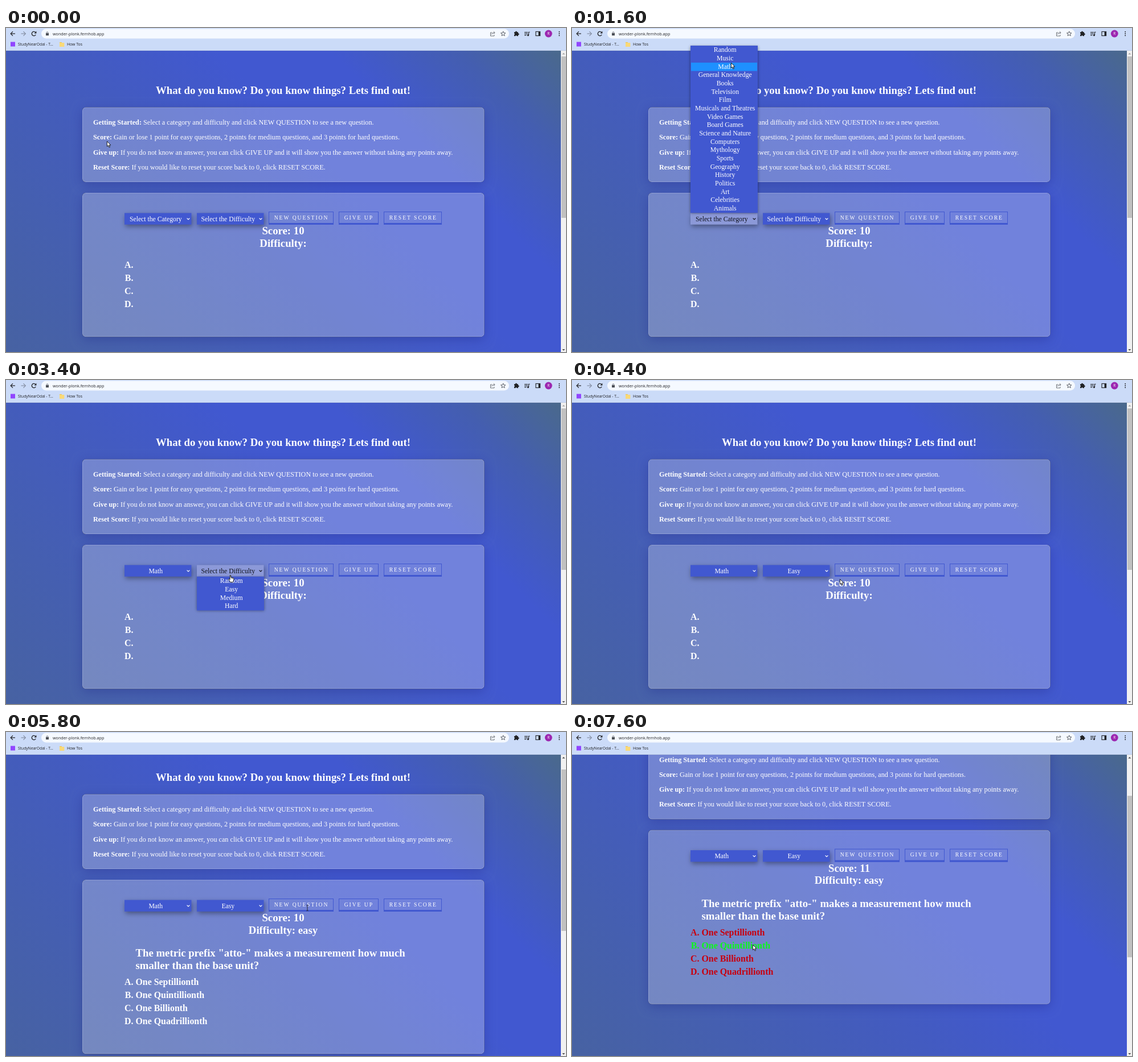
An HTML page with a canvas for the animation above (8 s loop, 983 by 570 pixels).

```html
<!DOCTYPE html>
<html lang="en">
<head>
<meta charset="utf-8">
<title>Quiz page</title>
<style>
  html, body { margin: 0; width: 100%; height: 100%; overflow: hidden; background: #4158d0; }
  canvas { display: block; }
</style>
</head>
<body>
<canvas id="stage" width="983" height="570"></canvas>
<script>
const ctx = document.getElementById('stage').getContext('2d');
const LOOP = 8000, TOP = 40, VIEW_W = 974;
const SERIF = '"Liberation Serif", "Times New Roman", serif';
const SANS = '"Open Sans", "Noto Sans", sans-serif';
const BLUE = '#4158d0', INK = '#202124';
const ROW = 14.66;

const CATEGORIES = ['Random', 'Music', 'Math', 'General Knowledge', 'Books', 'Television', 'Film',
  'Musicals and Theatres', 'Video Games', 'Board Games', 'Science and Nature', 'Computers', 'Mythology',
  'Sports', 'Geography', 'History', 'Politics', 'Art', 'Celebrities', 'Animals'];
const LEVELS = ['Random', 'Easy', 'Medium', 'Hard'];
const ANSWERS = ['One Septillionth', 'One Quintillionth', 'One Billionth', 'One Quadrillionth'];
const HELP = [
  ['Getting Started:', ' Select a category and difficulty and click NEW QUESTION to see a new question.'],
  ['Score:', ' Gain or lose 1 point for easy questions, 2 points for medium questions, and 3 points for hard questions.'],
  ['Give up:', ' If you do not know an answer, you can click GIVE UP and it will show you the answer without taking any points away.'],
  ['Reset Score:', ' If you would like to reset your score back to 0, click RESET SCORE.']
];

// Pointer path: time, x, y
const PATH = [
  [0, 177, 199], [700, 317, 335], [1200, 317, 335], [1600, 279, 61], [1700, 279, 61], [1800, 281, 70],
  [2000, 281, 70], [2200, 283, 82], [2300, 312, 316], [2400, 312, 316], [2600, 395, 355], [2700, 395, 355],
  [2800, 395, 359], [2900, 395, 359], [3100, 396, 338], [3300, 396, 338], [3400, 394, 343], [3500, 394, 343],
  [3800, 393, 364], [4000, 393, 364], [4400, 470, 350], [4600, 470, 350], [4800, 537, 323], [4900, 537, 323],
  [5100, 535, 321], [5200, 535, 321], [5500, 529, 309], [6200, 529, 309], [6500, 337, 336], [6800, 337, 336],
  [7000, 328, 361], [7100, 328, 361], [7300, 317, 375], [7500, 317, 375], [7600, 317, 374], [8000, 317, 374]
];

function pointerAt(t) {
  const i = PATH.findIndex(p => p[0] > t);
  const [t0, x0, y0] = PATH[i - 1], [t1, x1, y1] = PATH[i];
  const k = (t - t0) / (t1 - t0);
  return { x: x0 + (x1 - x0) * k, y: y0 + (y1 - y0) * k };
}

const between = (t, a, b) => t >= a && t < b;

function text(str, x, y, size, opt = {}) {
  ctx.font = `${opt.bold ? 'bold ' : ''}${size}px ${opt.font || SERIF}`;
  ctx.fillStyle = opt.color || '#fff';
  ctx.textAlign = opt.align || 'left';
  ctx.letterSpacing = opt.spacing || '0px';
  ctx.fillText(str, x, y);
  return ctx.measureText(str).width;
}

function box(x, y, w, h, fill) {
  ctx.fillStyle = fill;
  ctx.fillRect(x, y, w, h);
}

function poly(points, fill) {
  ctx.beginPath();
  points.forEach(([x, y]) => ctx.lineTo(x, y));
  ctx.closePath();
  if (fill) { ctx.fillStyle = fill; ctx.fill(); }
}

function line(points, color = INK, width = 1.2) {
  ctx.beginPath();
  points.forEach(([x, y]) => ctx.lineTo(x, y));
  ctx.strokeStyle = color;
  ctx.lineWidth = width;
  ctx.stroke();
}

function disc(x, y, r, fill) {
  ctx.beginPath();
  ctx.arc(x, y, r, 0, 7);
  ctx.fillStyle = fill;
  ctx.fill();
}

function withShadow(color, dx, dy, blur, draw) {
  ctx.save();
  ctx.shadowColor = color;
  ctx.shadowOffsetX = dx;
  ctx.shadowOffsetY = dy;
  ctx.shadowBlur = blur;
  draw();
  ctx.restore();
}

function backdrop() {
  // 45 degree gradient over the fixed viewport
  const cx = VIEW_W / 2, cy = TOP + 265, r = (VIEW_W + 530) / 4;
  const g = ctx.createLinearGradient(cx - r, cy + r, cx + r, cy - r);
  [[0, '#4762a2'], [.2, '#455fb0'], [.42, '#435bc0'], [.6, BLUE], [.73, BLUE], [.88, '#445eb0'], [1, '#4a698c']]
    .forEach(([p, c]) => g.addColorStop(p, c));
  box(0, TOP, VIEW_W, 530, g);
}

function card(y, h) {
  const x = 134, w = 705.5;
  const shape = new Path2D();
  shape.roundRect(x, y, w, h, 6);
  const outside = new Path2D();
  outside.rect(0, -200, 983, 1200);
  outside.addPath(shape);
  ctx.save();
  ctx.clip(outside, 'evenodd');
  withShadow('rgba(31,38,135,.37)', 0, 4.7, 18.75, () => { ctx.fillStyle = '#000'; ctx.fill(shape); });
  ctx.restore();
  ctx.fillStyle = 'rgba(255,255,255,.25)';
  ctx.fill(shape);
  ctx.beginPath();
  ctx.roundRect(x + .5, y + .5, w - 1, h - 1, 5.5);
  ctx.strokeStyle = 'rgba(255,255,255,.2)';
  ctx.lineWidth = 1;
  ctx.stroke();
}

function select(x, label, open) {
  withShadow('rgba(0,0,0,.38)', 1.5, 3.5, 8, () => box(x, 325.5, 117.5, 20.3, open ? '#8c99d8' : BLUE));
  const color = open ? '#10121c' : '#fff';
  text(label, x + 54.8, 339.8, 11.72, { align: 'center', color });
  line([[x + 109.6, 334.6], [x + 112, 337], [x + 114.4, 334.6]], color, 1.2);
}

function button(x, w, label, hover) {
  const y = hover ? 325 : 323;
  if (hover) {
    box(x, y, w, 23, BLUE);
  } else {
    ctx.strokeStyle = BLUE;
    ctx.lineWidth = 1;
    ctx.strokeRect(x + .5, y + .5, w - 1, 22);
    box(x, y + 20, w, 3, BLUE);
  }
  text(label, x + 9.7, y + 13.7, 9.6, { spacing: '1.95px' });
}

function menu(x, y, items, mouse) {
  const h = items.length * ROW + 1;
  withShadow('rgba(0,0,0,.45)', 0, 1, 5, () => box(x, y, 118, h, BLUE));
  const hot = Math.floor((mouse.y - y - .6) / ROW);
  if (hot >= 0 && hot < items.length) box(x + 1, y + .6 + hot * ROW, 116, ROW, '#1e90ff');
  items.forEach((s, i) => text(s, x + 60.7, y + 11.4 + i * ROW, 11.72, { align: 'center' }));
}

function page(t, mouse, scroll) {
  const asked = t >= 5300, solved = t >= 7600, grow = asked ? 53 : 0;
  const mid = { bold: true, align: 'center' };
  ctx.save();
  ctx.beginPath();
  ctx.rect(0, TOP, VIEW_W, 530);
  ctx.clip();
  backdrop();
  ctx.translate(0, -scroll);
  text('What do you know? Do you know things? Lets find out!', 486.5, 116.3, 18.75, mid);

  if (!between(t, 2200, 2300)) {
    card(139.5, 131.5);
    HELP.forEach(([head, body], i) => {
      const y = 170.2 + i * 26.2;
      const w = text(head, 153, y, 12.19, { bold: true });
      text(body, 153 + w, y, 12.19);
    });

    card(290, 253.3 + grow);
    select(208, t < 2200 ? 'Select the Category' : 'Math', between(t, 900, 2200));
    select(335, t < 4100 ? 'Select the Difficulty' : 'Easy', between(t, 3100, 4100));
    button(461, 114, 'NEW QUESTION', between(t, 4800, 5300));
    button(584, 70, 'GIVE UP');
    button(663, 102, 'RESET SCORE');
    text('Score: ' + (solved ? 11 : 10), 486.5, 363.2, 18.75, mid);
    text('Difficulty:' + (asked ? ' easy' : ''), 486.5, 384.9, 18.75, mid);
    if (asked) {
      text('The metric prefix "atto-" makes a measurement how much', 227.5, 425.4, 18.75, { bold: true });
      text('smaller than the base unit?', 227.5, 447, 18.75, { bold: true });
    }
    const hot = t >= 6900 ? Math.floor((mouse.y + scroll - 459.2) / 22.9) : -1;
    ANSWERS.forEach((s, i) => {
      const y = 422.4 + grow + i * 22.9;
      let color = i === hot ? BLUE : '#fff';
      if (solved) color = i === 1 ? '#0cf81c' : '#c8000f';
      text('ABCD'[i] + '.', 223.4, y, 15.9, { bold: true, align: 'right', color });
      if (asked) text(s, 227.5, y, 15.9, { bold: true, color });
    });
  }
  ctx.restore();
}

function scrollbar(scroll) {
  box(VIEW_W, TOP, 9, 530, '#f1f1f1');
  box(VIEW_W + 1, 50 + scroll * .53, 8, 284, '#c1c1c1');
  poly([[976.3, 46.5], [981.3, 46.5], [978.8, 43.8]], scroll ? '#505050' : '#a3a3a3');
  poly([[976.3, 565], [981.3, 565], [978.8, 567.7]], '#505050');
}

function arrowIcon(x, dir, color) {
  line([[x - 4 * dir, 10], [x + 4 * dir, 10]], color);
  line([[x, 6.2], [x - 3.8 * dir, 10], [x, 13.8]], color);
}

function toolbar() {
  box(0, 0, 983, TOP, '#cbdbf8');
  box(0, TOP - .7, 983, .7, '#b5c3dd');
  ctx.beginPath();
  ctx.roundRect(62, 1.5, 821, 17, 8.5);
  ctx.fillStyle = '#f5f9ff';
  ctx.fill();
  arrowIcon(12, 1, INK);
  arrowIcon(30.5, -1, '#8690a3');

  ctx.strokeStyle = INK;
  ctx.lineWidth = 1.3;
  ctx.beginPath();
  ctx.arc(49, 10, 3.7, .5, 5.5);
  ctx.stroke();
  poly([[53.4, 5.6], [53.4, 9.4], [49.6, 9.4]], INK);

  box(70, 9, 5, 4.2, '#4b4f56');
  ctx.strokeStyle = '#4b4f56';
  ctx.lineWidth = .9;
  ctx.beginPath();
  ctx.arc(72.5, 8.6, 1.6, Math.PI, 0);
  ctx.stroke();
  text('wonder-plonk.fernhob.app', 82, 12.7, 7.2, { font: SANS, color: INK });

  // share, star
  line([[853, 8], [850.5, 8], [850.5, 14], [857, 14], [857, 12]], '#5f6368', .9);
  line([[852.5, 11.5], [853.5, 9], [857.5, 8.3]], '#5f6368', .9);
  line([[855.8, 6], [858.2, 8.3], [855.8, 10.4]], '#5f6368', .9);
  poly(Array.from({ length: 10 }, (_, i) => {
    const a = i * Math.PI / 5, r = i % 2 ? 1.9 : 4.4;
    return [872.7 + r * Math.sin(a), 10.2 - r * Math.cos(a)];
  }));
  ctx.lineWidth = .9;
  ctx.strokeStyle = '#4b4f56';
  ctx.stroke();

  // extensions, queue, side panel
  box(892, 7.2, 7, 7, INK);
  disc(895.5, 7, 1.5, INK);
  disc(899.2, 10.7, 1.5, INK);
  disc(892, 10.7, 1.1, '#cbdbf8');
  disc(895.5, 14.2, 1.1, '#cbdbf8');
  [7, 9.6].forEach(y => box(910, y, 6, 1.1, INK));
  box(910, 12.2, 3.6, 1.1, INK);
  line([[919.5, 7.3], [917.5, 7.3], [917.5, 12.6]], INK, 1.1);
  disc(916.4, 12.7, 1.5, INK);
  ctx.strokeStyle = INK;
  ctx.lineWidth = 1.1;
  ctx.strokeRect(930, 6.4, 7.6, 7.2);
  box(934.6, 6.4, 3.2, 7.2, INK);

  disc(952.3, 10, 6.4, '#9c27b0');
  text('R', 952.3, 12.3, 6.5, { font: SANS, align: 'center' });
  [6.7, 10, 13.3].forEach(y => disc(971.2, y, .95, INK));

  // bookmarks
  box(8, 24.5, 8, 8, '#9146ff');
  text('StudyNearOdal - T...', 21, 31.2, 6.7, { font: SANS, color: INK });
  box(94, 25, 4, 2, '#eec44f');
  box(94, 26, 8.3, 7, '#f9d978');
  text('How Tos', 107, 31.2, 6.9, { font: SANS, color: INK });
}

function cursor(kind, { x, y }) {
  ctx.save();
  ctx.translate(x, y);
  ctx.lineJoin = 'round';
  ctx.strokeStyle = '#111';
  ctx.lineWidth = .9;
  if (kind === 'arrow') {
    poly([[.4, .4], [.4, 9.4], [2.5, 7.5], [4, 11], [5.5, 10.4], [4, 7], [6.9, 7]], '#fff');
    ctx.stroke();
  } else if (kind === 'hand') {
    poly([[-.9, .6], [.5, .6], [.9, 4.3], [3, 4.6], [5.6, 5.6], [6, 7.2], [5.4, 10], [4.6, 12.6],
      [-.4, 12.6], [-1.6, 10.4], [-3.6, 7.6], [-2.8, 6.8], [-.9, 8.3]], '#fff');
    ctx.stroke();
    line([[2.2, 5], [2.2, 7]], '#111', .6);
    line([[4, 5.4], [4, 7.2]], '#111', .6);
  } else {
    line([[-1.7, -4.6], [0, -4], [1.7, -4.6]], '#222', .8);
    line([[-1.7, 5.6], [0, 5], [1.7, 5.6]], '#222', .8);
    line([[0, -4], [0, 5]], '#222', .9);
  }
  ctx.restore();
}

function cursorKind(t) {
  if (between(t, 5800, 6300)) return 'text';
  if (between(t, 3400, 4100) || between(t, 4800, 5400) || between(t, 6900, 7600)) return 'hand';
  return 'arrow';
}

function draw(now) {
  const t = Math.floor(now % LOOP / 100) * 100;
  const mouse = pointerAt(t);
  const scroll = t < 5800 ? 0 : t < 5900 ? 30 : 117.5;
  page(t, mouse, scroll);
  scrollbar(scroll);
  toolbar();
  if (between(t, 900, 2200)) menu(208, 31, CATEGORIES, mouse);
  if (between(t, 3100, 4100)) menu(335, 345.8, LEVELS, mouse);
  cursor(cursorKind(t), mouse);
}

let start;
function tick(now) {
  start ??= now;
  draw(Math.max(0, now - start));
  requestAnimationFrame(tick);
}
requestAnimationFrame(tick);
</script>
</body>
</html>
```
